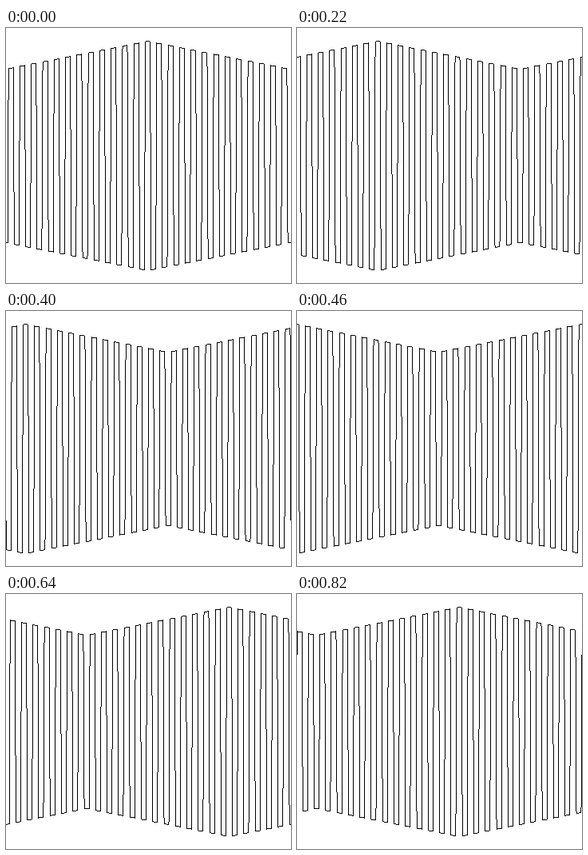
An HTML page with a canvas that plays this animation: 357 by 319 pixels, repeating every 0.88 s.

```html
<!DOCTYPE html>
<html>
<head>
<meta charset="utf-8">
<style>
html, body { margin: 0; overflow: hidden; background: #fff; }
canvas { display: block; }
</style>
</head>
<body>
<canvas id="stage" width="357" height="319"></canvas>
<script>
const W = 357, H = 319, MIDDLE = 160;
const SAMPLE = W / 300;       // 12 samples per square wave cycle
const HALF = 6 * SAMPLE;      // one flat cap plus one flank
const CAP = 2.5 * SAMPLE;     // half the width of a cap
const ctx = document.getElementById('stage').getContext('2d');

// Pixel line without antialiasing, between subpixel ends
function line([x0, y0], [x1, y1]) {
  const n = Math.ceil(Math.max(Math.abs(x1 - x0), Math.abs(y1 - y0)));
  for (let i = 0; i <= n; i++) {
    ctx.fillRect(Math.floor(x0 + (x1 - x0) * i / n), Math.floor(y0 + (y1 - y0) * i / n), 1, 1);
  }
}

// Triangular envelope, tallest at offset 0
function amplitude(offset) {
  const d = Math.abs(offset) % W;
  return 143.4 - 35 * Math.min(d, W - d) / (W / 2);
}

function draw(step) {
  const peak = 177.55 - step * W / 14;
  ctx.fillStyle = '#fff';
  ctx.fillRect(0, 0, W, H);
  ctx.fillStyle = '#000';
  let last = null;
  for (let k = -27; k <= 75; k++) {
    for (const side of [-CAP, 0, CAP]) {
      const offset = k * HALF + side;
      const sign = k % 2 ? 1 : -1;
      const point = [peak + offset, MIDDLE + sign * amplitude(offset)];
      if (last) line(last, point);
      last = point;
    }
  }
}

let shown = -1;
function tick() {
  const t = performance.now() % 880;
  const step = t < 100 ? 0 : 1 + Math.floor((t - 100) / 60);
  if (step !== shown) draw(shown = step);
  requestAnimationFrame(tick);
}
tick();
</script>
</body>
</html>
```
